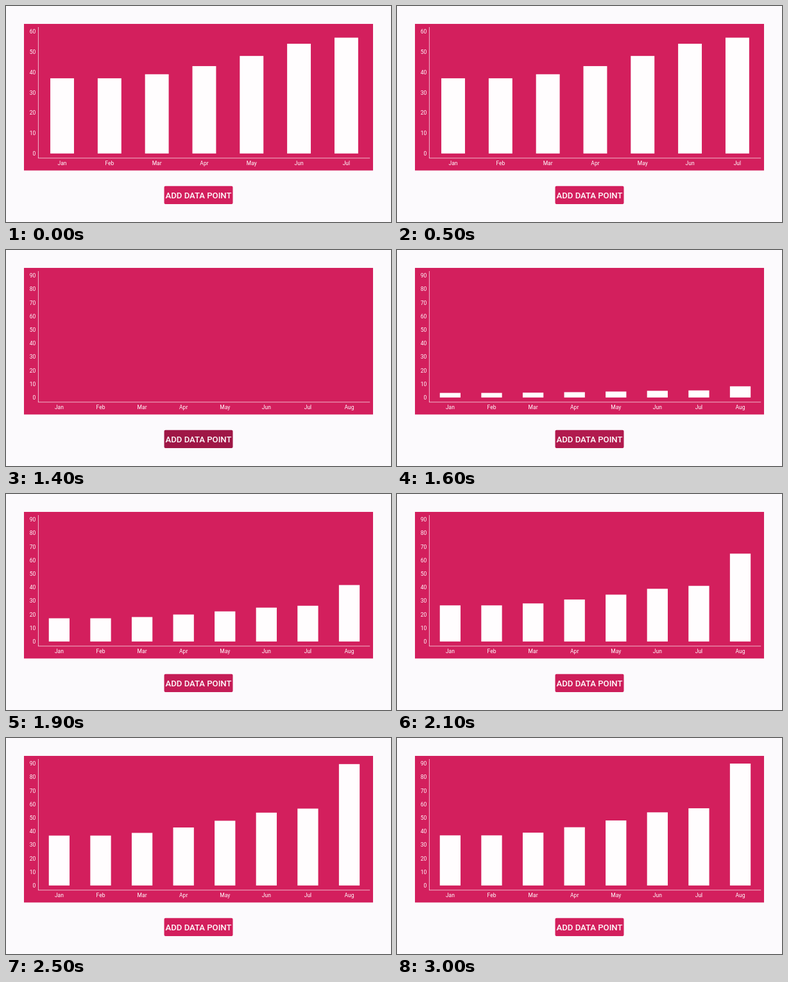
An HTML page with a canvas that plays this animation: 600x338 px, repeating every 4.4 s.

```html
<!DOCTYPE html>
<html lang="en">
<head>
<meta charset="utf-8">
<title>Bar chart</title>
<style>
html, body { margin: 0; width: 100%; height: 100%; overflow: hidden; background: #fcfafd; }
canvas { display: block; width: 600px; height: 338px; }
</style>
</head>
<body>
<canvas id="stage"></canvas>
<script>
const LOOP = 4400, STEP = 100;
const PRESS = 1300, FADE_TIME = 1150;
const ADD = 1400, GROW_START = 1450, GROW_TIME = 1120;
const PINK = '#d31f5d', WHITE = '#fffdfe', LINE = 'rgba(255,255,255,.68)';
const SALES = { Jan: 37, Feb: 37, Mar: 39, Apr: 43, May: 48, Jun: 54, Jul: 57, Aug: 90 };
const plot = { left: 50.6, right: 567.3, base: 230.8, height: 190.8 };

const canvas = document.getElementById('stage');
const ctx = canvas.getContext('2d');
const ratio = window.devicePixelRatio || 1;
canvas.width = Math.round(600 * ratio);
canvas.height = Math.round(338 * ratio);

const progress = (t, from, time) => Math.min(1, Math.max(0, (t - from) / time));
// Slow start, longer slow end
const ease = x => 1 - (1 - x ** 1.6) ** 2.35;

function rect(x, y, w, h, color) {
  ctx.fillStyle = color;
  ctx.fillRect(x, y, w, h);
}

function text(str, x, y, align, font) {
  ctx.font = font + ' Roboto, sans-serif';
  ctx.textAlign = align;
  ctx.fillStyle = WHITE;
  ctx.fillText(str, x, y);
}

function drawChart(count, grow) {
  const bars = Object.entries(SALES).slice(0, count);
  const max = Math.ceil(Math.max(...bars.map(bar => bar[1])) / 10) * 10;
  const scale = plot.height / max;
  const slot = (plot.right - plot.left) / count;

  rect(28, 28, 544, 229.4, PINK);
  rect(49.9, 33, 1, 205, LINE);
  rect(49.9, 237.5, 517.3, 1, LINE);

  for (let v = 0; v <= max; v += 10) {
    text(v, 46.4, plot.base + 3.1 - v * scale, 'right', '8.5px');
  }
  bars.forEach(([month, value], i) => {
    const mid = plot.left + slot * (i + .5);
    const h = value * scale * grow;
    rect(mid - slot / 4, plot.base - h, slot / 2, h, WHITE);
    text(month, mid, 248.5, 'center', '8.5px');
  });
}

function drawButton(dark) {
  const mix = (a, b) => Math.round(a + (b - a) * dark);
  ctx.fillStyle = `rgb(${mix(211, 149)},${mix(31, 22)},${mix(93, 66)})`;
  ctx.beginPath();
  ctx.roundRect(246.5, 281.7, 107, 28.2, 2);
  ctx.fill();
  text('ADD DATA POINT', 300, 300.8, 'center', '500 13.1px');
}

function draw(t) {
  ctx.setTransform(ratio, 0, 0, ratio, 0, 0);
  rect(0, 0, 600, 338, '#fcfafd');
  if (t < ADD) drawChart(7, 1);
  else drawChart(8, ease(progress(t, GROW_START, GROW_TIME)));
  drawButton(t < PRESS ? 0 : (1 - progress(t, PRESS, FADE_TIME)) ** 2);
}

const start = performance.now();
function tick() {
  const t = (performance.now() - start) % LOOP;
  draw(Math.floor(t / STEP) * STEP);
  requestAnimationFrame(tick);
}
tick();
</script>
</body>
</html>
```
